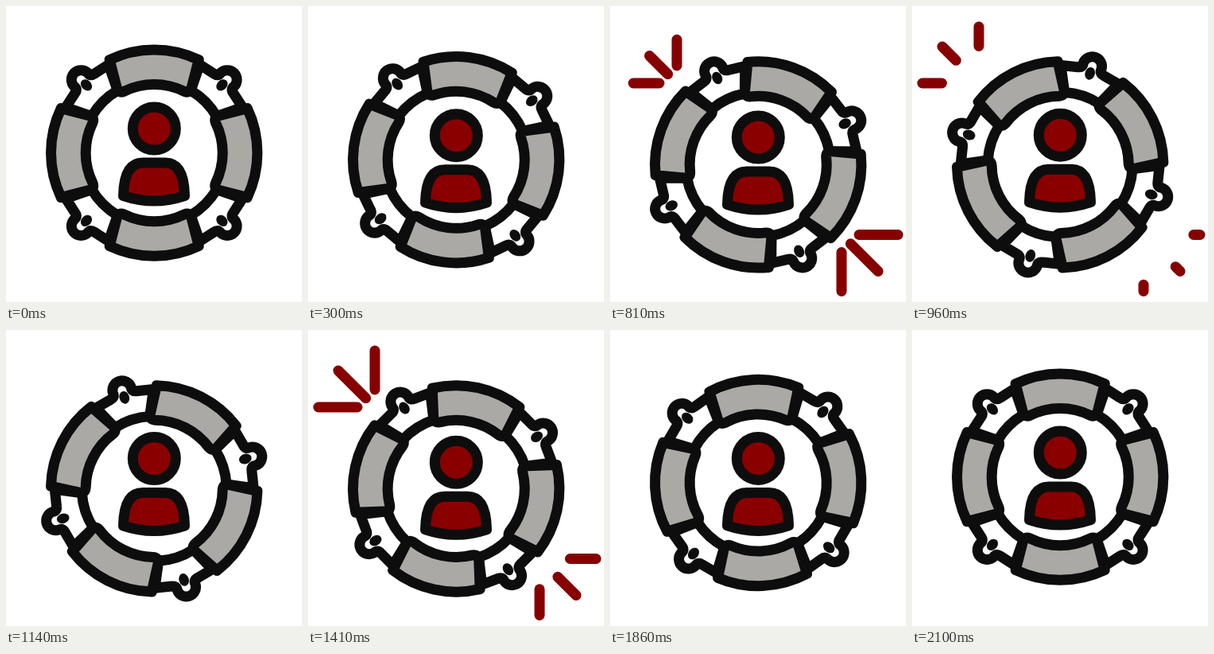
These frames come from a looping animation (372x372 px, 2250 ms). An HTML page:

```html
<!DOCTYPE html>
<html lang="en">
<head>
<meta charset="utf-8">
<title>Lifebuoy</title>
<style>
  html, body { margin: 0; width: 100%; height: 100%; overflow: hidden; background: #fff; }
  svg { display: block; width: 100vw; height: 100vh; }
  .ink { stroke: #0d0d0d; stroke-width: 13; stroke-linejoin: round; stroke-linecap: round; }
  .ray { stroke: #860000; stroke-width: 13; stroke-linecap: round; }
  .red { fill: #8a0000; }
  .grey { fill: #aaa9a5; }
  .white { fill: #fff; }
</style>
</head>
<body>
<svg viewBox="0 0 372 372">
  <defs>
    <g id="lug">
      <path class="ink white" d="M-38-119L-17-123.5Q-11-124.5-12-130A12 12 0 0 1 12-130Q11-124.5 17-123.5L38-119L23-88A91 91 0 0 0-23-88Z"/>
      <ellipse cy="-120.5" rx="6.2" ry="8" fill="#0d0d0d"/>
    </g>
    <path id="pad" class="ink grey" d="M-56-117A130 130 0 0 1 56-117L47-82Q45-74.5 38-77.2A86 86 0 0 0-38-77.2Q-45-74.5-47-82Z"/>
  </defs>
  <g id="rays"></g>
  <g id="ring"></g>
  <g id="person" class="ink red">
    <circle cx="186.3" cy="154" r="27"/>
    <path d="M147.5 238.5C148 208 158 197 172 197H200C214 197 224 208 224.5 238.5Q186 251.5 147.5 238.5Z"/>
  </g>
</svg>
<script>
const STEP = 30, LOOP = 2250, END = 2100;
const DEPTH = 14.8, RISE = 7.5;            // how far the ring sinks, how far the person bobs up
const SUNK = 540, LIFT = 1620;             // ring is down between these times
const PULSE = 540, FIRST = 570, SWEEP = 180;
const $ = id => document.getElementById(id);

function add(parent, tag, attrs) {
  const el = document.createElementNS('http://www.w3.org/2000/svg', tag);
  for (const k in attrs) el.setAttribute(k, attrs[k]);
  return parent.appendChild(el);
}

for (const [id, first] of [['lug', 45], ['pad', 0]])
  for (let i = 0; i < 4; i++)
    add($('ring'), 'use', { href: '#' + id, transform: `rotate(${first + i * 90})` });

// A quarter fan of three rays around a corner
function fan(x, y, turn, delay) {
  const group = add($('rays'), 'g', { transform: `translate(${x} ${y}) rotate(${turn})` });
  return [0, 45, 90].map(angle => ({
    delay,
    inner: angle === 45 ? 16 : 22,
    el: add(group, 'line', { class: 'ray', transform: `rotate(${angle})` })
  }));
}
const rays = [...fan(84, 97, 180, 120), ...fan(291, 287.5, 0, 60)];

const clamp = x => Math.min(1, Math.max(0, x));
const ramp = (t, from, to) => clamp((t - from) / (to - from));
function ease(t, from, to) {
  const u = ramp(t, from, to);
  return u * u * (3 - 2 * u);
}

function drawRay({ el, inner, delay }, t) {
  const local = t < FIRST || t >= FIRST + 2 * PULSE ? 0 : (t - FIRST) % PULSE;
  const head = ramp(local, delay, delay + SWEEP);
  const tail = ramp(local, delay + SWEEP, delay + 2 * SWEEP);
  el.style.display = head > tail ? '' : 'none';
  el.setAttribute('x1', inner + 49 * tail);
  el.setAttribute('x2', inner + 49 * head);
}

function draw(ms) {
  const t = Math.min(END, Math.floor(ms % LOOP / STEP) * STEP);
  const sink = DEPTH * (ease(t, 0, SUNK) - ease(t, LIFT, END));
  const bob = RISE * (1 - Math.cos(2 * Math.PI * ramp(t, SUNK, LIFT))) / 2;
  const angle = 360 * ease(t, 150, 1950);
  $('ring').setAttribute('transform', `translate(186.2 ${184.6 + sink}) rotate(${angle})`);
  $('person').setAttribute('transform', `translate(0 ${sink - bob})`);
  rays.forEach(ray => drawRay(ray, t));
}

const start = performance.now();
function tick() {
  draw(performance.now() - start);
  requestAnimationFrame(tick);
}
tick();
</script>
</body>
</html>
```
